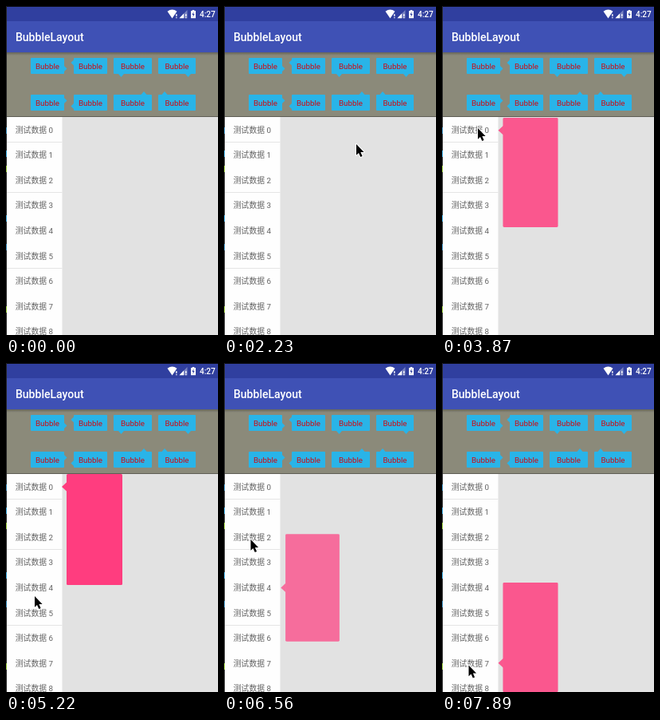
Recreate the animation shown at these times as an HTML page. Size 266 px wide and 412 px high, loop 8 s.

```html
<!DOCTYPE html>
<html lang="zh">
<head>
<meta charset="utf-8">
<title>BubbleLayout</title>
<style>
  html, body { margin: 0; width: 100%; height: 100%; overflow: hidden; background: #e2e2e2; }
  svg { display: block; }
  text { font-family: Roboto, "Noto Sans CJK SC", "Noto Sans CJK", sans-serif; }
  .label { font-size: 9.8px; fill: #d00a12; text-anchor: middle; }
  .row { font-size: 9.8px; fill: #626262; }
  .bar { fill: #fff; font-weight: 500; }
</style>
</head>
<body>
<svg width="266" height="412" viewBox="0 0 266 412">
  <defs>
    <linearGradient id="shade" x2="0" y2="1">
      <stop stop-color="#66655a"/>
      <stop offset="1" stop-color="#8b8a7a"/>
    </linearGradient>
  </defs>
  <rect width="266" height="412" fill="#e2e2e2"/>
  <rect width="266" height="19" fill="#303f9f"/>
  <rect width="266" height="1" fill="#08080c"/>
  <rect y="19" width="266" height="39" fill="#3f51b5"/>
  <rect y="58" width="266" height="81" fill="#8b8a7a"/>
  <rect y="58" width="266" height="4" fill="url(#shade)"/>
  <rect y="138" width="266" height="1" fill="#5f5e55"/>
  <rect y="139" width="70.5" height="273" fill="#fefefe"/>

  <g fill="#fff">
    <path d="M202.5 6.8Q208.5 2.4 214.5 6.8L208.5 15.4Z"/>
    <path d="M213.2 10h1.3v3h-1.3zm0 4h1.3v1.3h-1.3z"/>
    <path d="M217.5 15.3L227.5 5V15.3Z" opacity=".35"/>
    <path d="M217.5 15.3L223 9.6V15.3Z"/>
    <path d="M225.2 10h1.3v3h-1.3zm0 4h1.3v1.3h-1.3z"/>
    <path d="M232 6H233.7V5H236.3V6H238V15.3H232Z"/>
    <path d="M235.6 7L233.4 11H234.8L234.5 14L236.6 10H235.2Z" fill="#303f9f"/>
  </g>
  <text class="bar" x="243" y="14" font-size="10">4:27</text>
  <text class="bar" x="12" y="44" font-size="14">BubbleLayout</text>

  <g id="bubbles" fill="#29b4e8"></g>
  <g id="list"></g>
  <g id="edge"></g>
  <g id="popup" fill="#ff3d7f">
    <rect id="body" x="76" width="70" height="139" rx="1.5"/>
    <path id="arrow"/>
  </g>
  <path id="cursor" d="M1 2V15.7L4 12.9L6.3 18L8.6 17L6.4 12H10.6Z"
        stroke="#fff" stroke-width="2" stroke-linejoin="round" paint-order="stroke"/>
</svg>
<script>
const $ = id => document.getElementById(id);

function add(parent, tag, attrs, text) {
  const el = document.createElementNS("http://www.w3.org/2000/svg", tag);
  for (const key in attrs) el.setAttribute(key, attrs[key]);
  if (text) el.textContent = text;
  $(parent).append(el);
}

// x, y, width, arrow path
const bubbles = [
  [31, 65, 42, "M73 75L76.5 78.5L73 82Z"],
  [85, 65, 42, "M85 67.5L81.5 71L85 74.5Z"],
  [135, 65, 48, "M141 85H148L144.5 89Z"],
  [191, 65, 47, "M225 85H232L228.5 89Z"],
  [31, 111, 42, "M73 115L76.5 118.5L73 122Z"],
  [85, 111, 42, "M85 122L81.5 125.5L85 129Z"],
  [135, 111, 48, "M169.5 111H176.5L173 107Z"],
  [191, 111, 47, "M195.5 111H202.5L199 107Z"]
];
for (const [x, y, width, d] of bubbles) {
  add("bubbles", "rect", { x, y, width, height: 20, rx: 1 });
  add("bubbles", "path", { d });
  add("bubbles", "text", { class: "label", x: x + width / 2, y: y + 13.5 }, "Bubble");
}

const rowY = i => 155 + 31.6 * i;
for (let i = 0; i < 9; i++) {
  add("list", "text", { class: "row", x: 11.8, y: rowY(i) + 3.6 }, "测试数据 " + i);
}
for (const y of [170, 233, 328]) {
  add("list", "rect", { x: 1, y, width: 69.5, height: 1, fill: "#e5e5e5" });
}

add("edge", "rect", { width: 1, height: 412, fill: "#222" });
for (const [y, fill] of [[152, "#2b7fb0"], [181, "#2b9bd0"], [200, "#8cc02c"], [262, "#2b9bd0"], [298, "#2b7fb0"], [376, "#8cc02c"]]) {
  add("edge", "rect", { y, width: 1, height: 8, fill });
}

const LOOP = 8000, TICK = 149;

// tick, x, y of the pointer tip
const moves = [
  [6, 241, 81], [9, 229, 130], [12, 176, 199], [14, 176, 199], [15, 165, 171],
  [18, 135, 122], [19, 135, 122], [24, 44, 151], [28, 44, 151], [33, 36, 382],
  [35, 35, 290], [40, 35, 290], [43, 32.5, 219], [46, 32.5, 219], [49, 32.5, 368],
  [50, 32.5, 376.5], [54, 32.5, 376.5]
];
// list item, top, opening tick, closing tick
const popups = [[0, 139, 26, 37], [4, 212, 39, 44], [2, 148, 46, 51], [7, 274, 53, 99]];

function drawCursor(tick) {
  const i = moves.findIndex(m => m[0] > tick);
  $("cursor").style.display = i ? "" : "none";
  if (!i) return;
  const [t0, x0, y0] = moves[i - 1], [t1, x1, y1] = moves[i];
  const k = (tick - t0) / (t1 - t0);
  $("cursor").setAttribute("transform", `translate(${x0 + (x1 - x0) * k} ${y0 + (y1 - y0) * k})`);
}

function drawPopup(tick) {
  const shown = popups.find(p => tick >= p[2] && tick <= p[3]);
  $("popup").style.display = shown ? "" : "none";
  if (!shown) return;
  const [item, top, open, close] = shown;
  const [alpha, scale] = tick === open ? [.84, .987] : tick === close ? [.7, .968] : [1, 1];
  const cy = top + 69.5, y = rowY(item);
  $("body").setAttribute("y", top);
  $("arrow").setAttribute("d", `M76.5 ${y - 6}L70 ${y}L76.5 ${y + 6}Z`);
  $("popup").setAttribute("opacity", alpha);
  $("popup").setAttribute("transform", `translate(111 ${cy}) scale(${scale}) translate(-111 ${-cy})`);
}

const start = performance.now();
function frame() {
  const time = (performance.now() - start) % LOOP;
  const tick = Math.min(53, Math.floor((time + 8) / TICK));
  drawCursor(tick);
  drawPopup(tick);
  requestAnimationFrame(frame);
}
frame();
</script>
</body>
</html>
```
